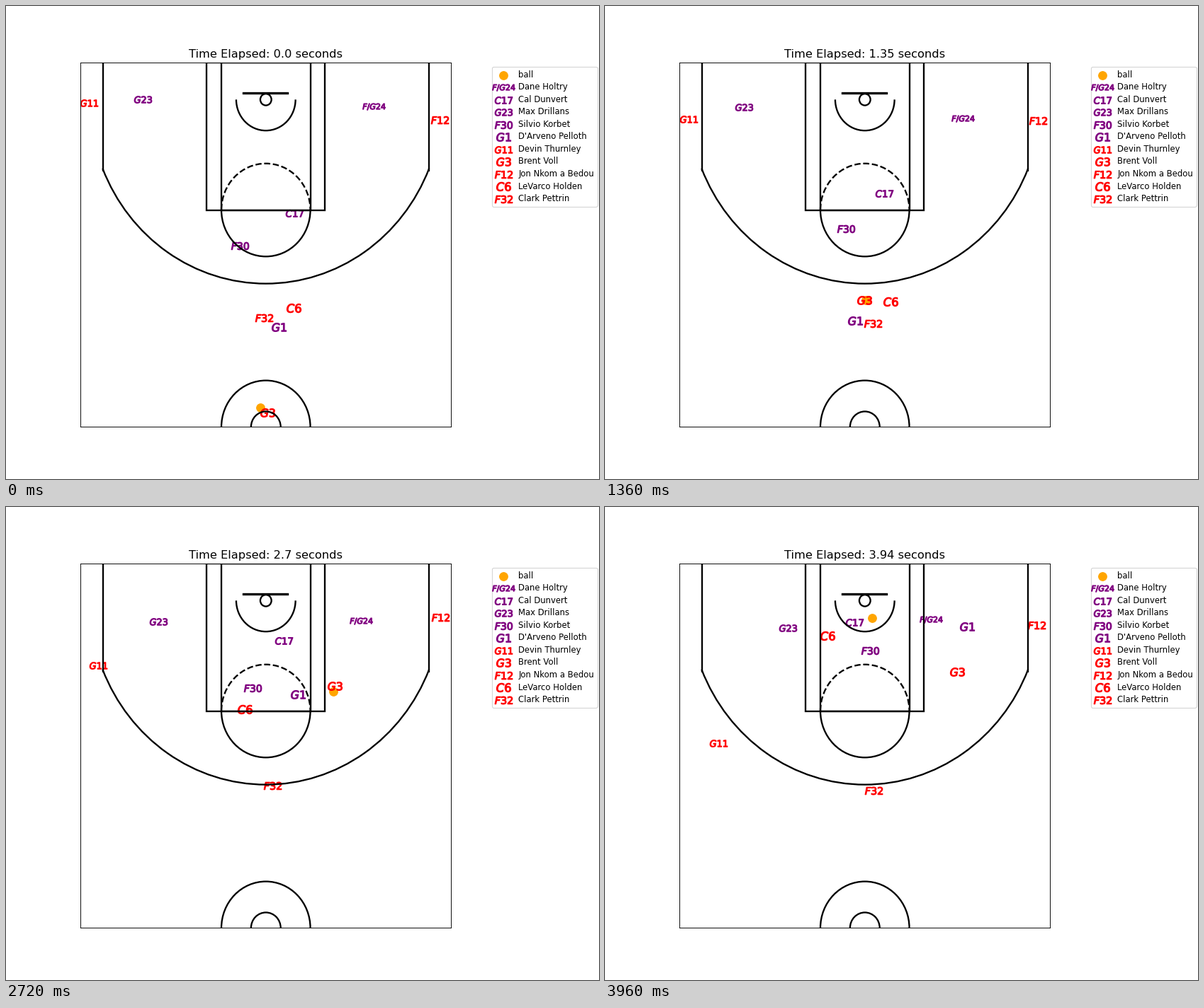
Write a matplotlib script that moves like this. It is 837 px wide and 669 px high and loops after 4 s.

```python
import numpy as np
import matplotlib.pyplot as plt
from matplotlib.animation import FuncAnimation
from matplotlib.patches import Arc, Circle, Rectangle

W, H, DPI = 837, 669, 83.7
FRAMES, STEP = 100, 40

plt.rcParams["font.family"] = "DejaVu Sans"
fig = plt.figure(figsize=((W + 0.01) / DPI, (H + 0.01) / DPI), dpi=DPI)
ax = fig.add_axes([0.1257, 0.11, 0.625, 0.77])
ax.set(xlim=(-250, 250), ylim=(422.5, -47.5), xticks=[], yticks=[])


def glide(points):
    """Smooth path through points that are evenly spaced over the loop."""
    p = np.array(points, float)
    m = np.gradient(p, axis=0)
    s = np.linspace(0, len(p) - 1, FRAMES)
    k = np.minimum(s.astype(int), len(p) - 2)
    u = (s - k)[:, None]
    return (p[k] * (1 + 2 * u) * (1 - u) ** 2
            + p[k + 1] * u * u * (3 - 2 * u)
            + m[k] * u * (1 - u) ** 2 - m[k + 1] * u * u * (1 - u))


def to_court(path):
    """Stage pixels (y down) to court units."""
    return ax.transData.inverted().transform(path * (1, -1) + (0, H))


pieces = []


def add(mark, color, name, *points):
    path = to_court(glide(points))
    ball = mark == "o"
    dot = ax.scatter(*path[0], s=100 if ball else 150 * len(mark),
                     marker=mark if ball else f"${mark}$",
                     color=color, label=name)
    pieces.append((dot, path))


add("o", "orange", "ball",
    (359, 568), (339, 472), (430, 320), (460, 243), (377, 157))
add("F/G24", "purple", "Dane Holtry",
    (519, 142), (505, 159), (503, 161), (460, 159))
add("C17", "purple", "Cal Dunvert",
    (407, 293), (394, 267), (393, 192), (352, 163))
add("G23", "purple", "Max Drillans",
    (193, 132), (196, 143), (213, 161), (258, 171))
add("F30", "purple", "Silvio Korbet",
    (330, 339), (340, 316), (347, 259), (374, 203))
add("G1", "purple", "D'Arveno Pelloth",
    (385, 454), (353, 448), (407, 273), (511, 169))
add("G11", "red", "Devin Thurnley",
    (117, 137), (118, 159), (129, 218), (160, 334))
add("G3", "red", "Brent Voll",
    (369, 575), (365, 421), (460, 258), (497, 233))
add("F12", "red", "Jon Nkom a Bedou",
    (612, 161), (611, 162), (613, 156), (609, 167))
add("C6", "red", "LeVarco Holden",
    (406, 427), (404, 420), (340, 293), (314, 182))
add("F32", "red", "Clark Pettrin",
    (364, 441), (378, 450), (376, 395), (379, 401))


def box(x, y, w, h):
    ax.add_patch(Rectangle((x, y), w, h, lw=2, ec="black", fill=False))


def arc(y, d, a, b, style="solid"):
    ax.add_patch(Arc((0, y), d, d, theta1=a, theta2=b, lw=2, ec="black",
                     linestyle=style))


# court lines, in tenths of a foot from the hoop
ax.add_patch(Circle((0, 0), 7.5, lw=2, ec="black", fill=False))
box(-30, -7.5, 60, -1)
for half in (80, 60):
    box(-half, -47.5, 2 * half, 190)
for side in (-220, 220):
    box(side, -47.5, 0, 140)
arc(142.5, 120, 0, 180)
arc(142.5, 120, 180, 0, "dashed")
arc(0, 80, 0, 180)
arc(0, 475, 22, 158)
for d in (120, 40):
    arc(422.5, d, 180, 0)

ax.legend(loc="upper left", bbox_to_anchor=(1.099, 1), fontsize=10,
          labelspacing=0.39, scatterpoints=1)
title = ax.set_title("", fontsize=14, x=0.499)


def clock(i):
    # four hundredths a frame, losing one every 47 frames
    return (4 * i - (i + 38) // 47) / 100


def draw(i):
    for dot, path in pieces:
        dot.set_offsets(path[i])
    title.set_text(f"Time Elapsed: {clock(i)} seconds")
    return [title] + [dot for dot, _ in pieces]


anim = FuncAnimation(fig, draw, frames=FRAMES, init_func=lambda: draw(0),
                     interval=STEP, repeat=True, repeat_delay=0, blit=False)
plt.show()
```
